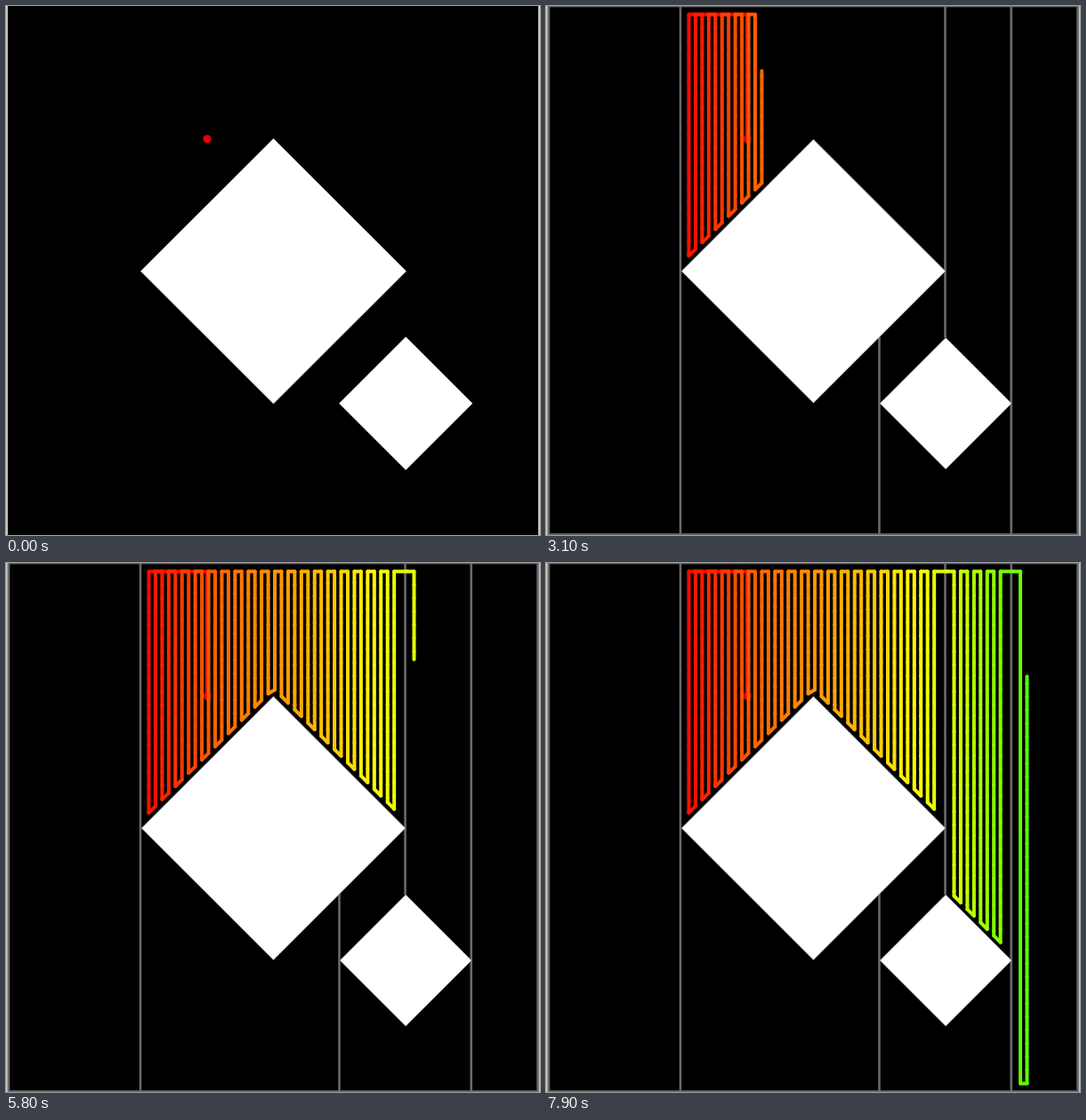
An HTML page with a canvas that plays this animation: 600 px wide and 595 px high, repeating every 8000 ms.

```html
<!DOCTYPE html>
<html lang="en">
<head>
<meta charset="utf-8">
<title>Coverage path</title>
<style>
  html, body { margin: 0; width: 600px; height: 595px; overflow: hidden; background: #000; }
  canvas { display: block; }
</style>
</head>
<body>
<canvas id="stage" width="600" height="595"></canvas>
<script>
const ctx = document.getElementById('stage').getContext('2d');
const LOOP = 8000, STEP = 100;
const GRID = 7.45, LEFT = 160.5, TOP = 9.5, BOTTOM = 585.5;
const START = [226, 149.5];
const columnX = k => LEFT + GRID * k;

// Lowest reachable point of a sweep column, just above the obstacle below it.
function floorY(k) {
  const x = columnX(k);
  if (k < 38) return 141 + Math.abs(x - 300.5);
  if (k < 48) return 365 + x - 449;
  return BOTTOM;
}

// Sweep: even columns go down, odd ones up; columns next to cell borders are skipped.
const points = [{ x: START[0], y: START[1], at: 0 }];
const columnStart = {};

function addPoint(x, y) {
  const last = points[points.length - 1];
  points.push({ x, y, at: last.at + Math.hypot(x - last.x, y - last.y) });
}

addPoint(START[0], TOP);
for (let k = 0; k <= 51; k++) {
  if ([38, 39, 48, 49].includes(k)) continue;
  const ends = [TOP, floorY(k)];
  if (k % 2) ends.reverse();
  addPoint(columnX(k), ends[0]);
  columnStart[k] = points[points.length - 1].at;
  addPoint(columnX(k), ends[1]);
}

// Time, column and distance travelled within that column.
const pace = [[3100, 11, 126], [4800, 30, 101], [5800, 40, 99], [6500, 44, 5], [7900, 51, 458]]
  .map(([time, k, d]) => [time, columnStart[k] + d]);
pace.unshift([1560, 0]);

function travelled(t) {
  if (t <= pace[0][0]) return 0;
  for (let i = 1; i < pace.length; i++) {
    const [t0, d0] = pace[i - 1], [t1, d1] = pace[i];
    if (t <= t1) return d0 + (d1 - d0) * (t - t0) / (t1 - t0);
  }
  return pace[pace.length - 1][1];
}

function line(x0, y0, x1, y1) {
  ctx.beginPath();
  ctx.moveTo(x0, y0);
  ctx.lineTo(x1, y1);
  ctx.stroke();
}

function diamond(x, y, r, outlined) {
  ctx.beginPath();
  ctx.moveTo(x, y - r);
  ctx.lineTo(x + r, y);
  ctx.lineTo(x, y + r);
  ctx.lineTo(x - r, y);
  ctx.closePath();
  ctx.fillStyle = '#fff';
  ctx.fill();
  if (outlined) {
    ctx.lineWidth = 0.8;
    ctx.strokeStyle = '#777';
    ctx.stroke();
  }
}

function drawCells(t) {
  ctx.strokeStyle = '#696969';
  ctx.lineWidth = 2.6;
  ctx.lineCap = 'butt';
  if (t >= 100) ctx.strokeRect(3, 0, 594.5, 594.5);
  if (t >= 200) line(151, 0, 151, 595);
  if (t >= 400) line(448.5, 0, 448.5, 373);
  if (t >= 600) line(374.5, 372, 374.5, 595);
  if (t >= 800) line(522.7, 0, 522.7, 595);
}

function drawStart() {
  ctx.fillStyle = '#e60000';
  ctx.beginPath();
  for (let i = 0; i < 16; i++) {
    const a = i * Math.PI / 8, r = i % 2 ? 4.9 : 4.3;
    ctx.lineTo(START[0] + r * Math.cos(a), START[1] + r * Math.sin(a));
  }
  ctx.fill();
}

function drawPath(length) {
  const piece = 15;
  ctx.lineWidth = 4;
  ctx.lineCap = 'round';
  for (let i = 1; i < points.length; i++) {
    const a = points[i - 1], b = points[i], span = b.at - a.at;
    const mix = f => [a.x + (b.x - a.x) * f, a.y + (b.y - a.y) * f];
    const end = Math.min(b.at, length);
    for (let d = a.at; d < end; d += piece) {
      const next = Math.min(d + piece, end);
      ctx.strokeStyle = `hsl(${d * 0.0081}, 100%, 50%)`;
      line(...mix((d - a.at) / span), ...mix((next - a.at) / span));
    }
  }
}

function draw(t) {
  ctx.fillStyle = '#000';
  ctx.fillRect(0, 0, 600, 595);
  ctx.fillStyle = '#c9c9c0';
  ctx.fillRect(0, 0, 2, 595);
  ctx.fillRect(598, 0, 2, 595);
  drawCells(t);
  const outlined = t >= 400, inset = outlined ? 1 : 0;
  diamond(300.5, 298.3, 149.3 - inset, outlined);
  diamond(449.2, 447, 75 - inset, outlined);
  drawStart();
  drawPath(travelled(t));
}

let shown = -1;
function tick(now) {
  const t = Math.floor((now % LOOP) / STEP) * STEP;
  if (t !== shown) draw(shown = t);
  requestAnimationFrame(tick);
}
draw(0);
requestAnimationFrame(tick);
</script>
</body>
</html>
```
